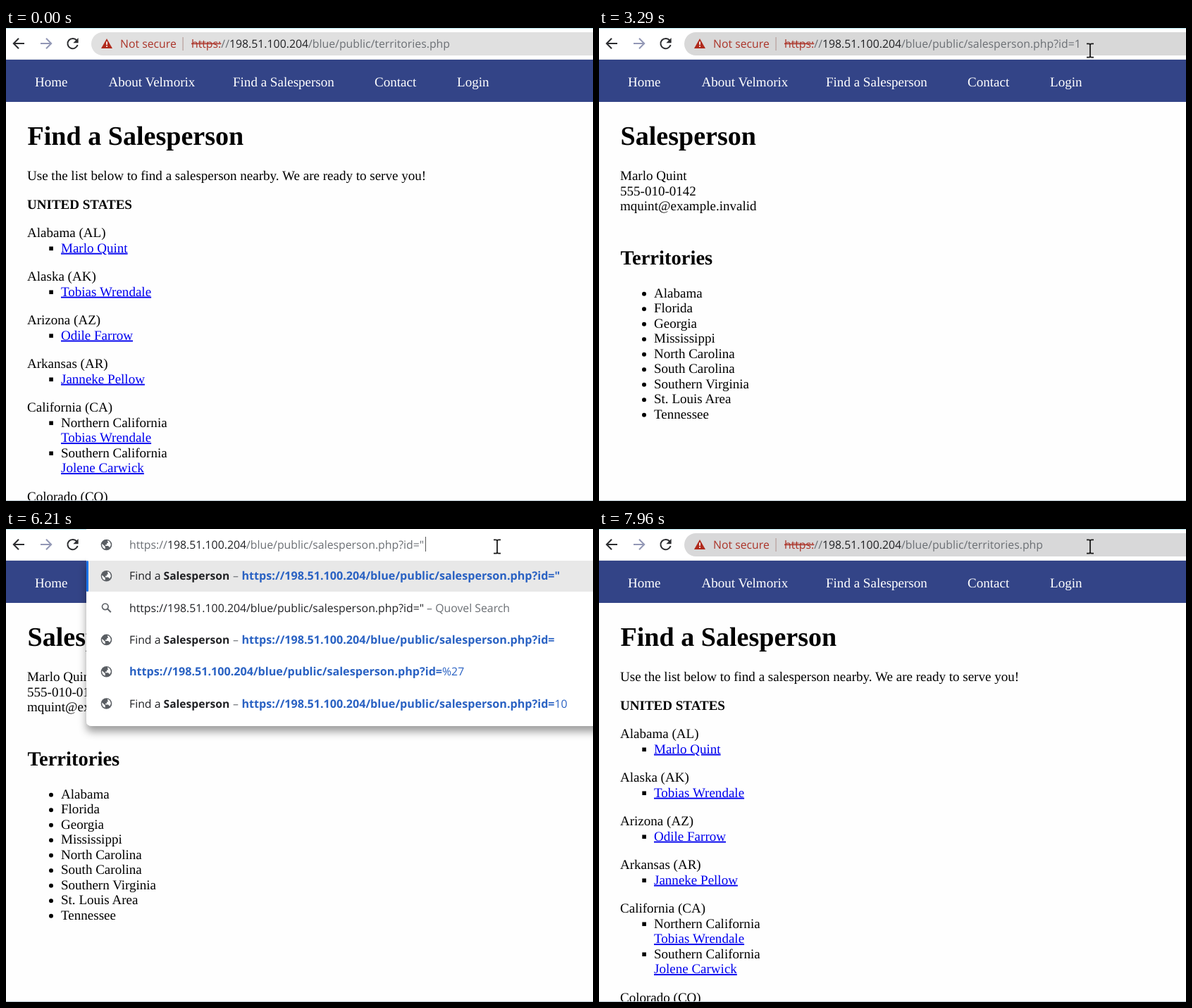
An HTML page for the animation above (8 s loop, 833 by 672 pixels).

```html
<!DOCTYPE html>
<html lang="en">
<head>
<meta charset="utf-8">
<title>Salesperson lookup</title>
<style>
html, body { margin: 0; width: 100%; height: 100%; overflow: hidden; background: #fff; }
svg { display: block; }
text { white-space: pre; text-rendering: geometricPrecision; font: 19.05px "Liberation Serif", serif; }
.h1 { font-size: 38.1px; font-weight: bold; }
.h2 { font-size: 28.6px; font-weight: bold; }
.bold { font-weight: bold; }
.link { fill: #0000ee; text-decoration: underline; }
.nav { fill: #fff; }
.ui { font: 15.82px "Open Sans", "Noto Sans", sans-serif; fill: #202124; }
.ui .strong { font-size: 16.15px; font-weight: 700; }
.ui .title { font-size: 15.6px; font-weight: 700; }
.blue { fill: #2a62c3; }
.grey { fill: #6b6f74; }
.red { fill: #ab3429; }
.struck { text-decoration: line-through; }
.line { fill: none; stroke: #2c2d30; stroke-width: 2; }
</style>
</head>
<body>
<svg id="stage" width="833" height="672" viewBox="0 0 833 672"></svg>
<script>
const LOOP = 8000;
const HOST = '198.51.100.204', DIR = '/blue/public/', PERSON = 'salesperson.php?id=';
const stage = document.getElementById('stage');

const text = (x, y, s, cls = '') => `<text x="${x}" y="${y}" class="${cls}">${s}</text>`;
const span = (s, cls) => `<tspan class="${cls}">${s}</tspan>`;
const rect = (x, y, w, h, fill, more = '') =>
  `<rect x="${x}" y="${y}" width="${w}" height="${h}" fill="${fill}" ${more}/>`;
const path = (d, more) => `<path d="${d}" ${more}/>`;
const at = (x, y, s) => `<g transform="translate(${x} ${y})">${s}</g>`;
const clamp = v => Math.max(0, Math.min(1, v));

// ---- Web pages

const NAV = [[41, 'Home'], [145.5, 'About Velmorix'], [322, 'Find a Salesperson'],
  [523, 'Contact'], [640, 'Login']];
const navBar = rect(0, 45, 833, 60, '#334487') +
  NAV.map(([x, s]) => text(x, 82.7, s, 'nav')).join('');

const square = y => rect(61.3, y - 8.2, 5.6, 5.6, '#000');
const AGENTS = [['Alabama (AL)', 'Marlo Quint'], ['Alaska (AK)', 'Tobias Wrendale'],
  ['Arizona (AZ)', 'Odile Farrow'], ['Arkansas (AR)', 'Janneke Pellow']];
const REGIONS = [['Northern California', 'Tobias Wrendale'], ['Southern California', 'Jolene Carwick']];

const listPage = text(30.5, 166, 'Find a Salesperson', 'h1') +
  text(30, 216, 'Use the list below to find a salesperson nearby. We are ready to serve you!') +
  text(30, 256.7, 'UNITED STATES', 'bold') +
  AGENTS.map(([state, name], i) => {
    const y = 297 + 62 * i;
    return text(30, y, state) + square(y + 21.7) + text(78, y + 21.7, name, 'link');
  }).join('') +
  text(30, 545, 'California (CA)') +
  REGIONS.map(([area, name], i) => {
    const y = 566.7 + 43 * i;
    return square(y) + text(78, y, area) + text(78, y + 21.5, name, 'link');
  }).join('') +
  text(30, 671.5, 'Colorado (CO)');

const TERRITORIES = ['Alabama', 'Florida', 'Georgia', 'Mississippi', 'North Carolina',
  'South Carolina', 'Southern Virginia', 'St. Louis Area', 'Tennessee'];
const personPage = text(30.5, 166, 'Salesperson', 'h1') +
  ['Marlo Quint', '555-010-0142', 'mquint@example.invalid']
    .map((s, i) => text(30, 216 + 21.5 * i, s)).join('') +
  text(30.5, 335.5, 'Territories', 'h2') +
  TERRITORIES.map((s, i) => {
    const y = 382.8 + 21.5 * i;
    return `<circle cx="64" cy="${y - 5}" r="3"/>` + text(78, y, s);
  }).join('');

// ---- Browser icons

const backArrow = path('M26 22H11M18 14.8L10.8 22L18 29.2', 'class="line"');
const nextArrow = path('M49 22H64M57 14.8L64.2 22L57 29.2', 'class="line" style="stroke:#9297b5"');
const reloadIcon = path('M100.3 17.6A7.2 7.2 0 1 0 101.6 24', 'class="line"') +
  path('M102.6 14V21.2H95.4Z', 'fill="#2c2d30"');
const stopIcon = path('M88 15.5L101.5 29M101.5 15.5L88 29', 'class="line" style="stroke-width:2.3"');
const warnIcon = path('M143 15L151 29H135Z', 'fill="#b02a1c"') +
  rect(142.2, 19.3, 1.7, 4.6, '#fff') + rect(142.2, 25.2, 1.7, 1.8, '#fff');
const infoIcon = '<circle cx="142.5" cy="22.5" r="7.3" fill="none" stroke="#5f6368" stroke-width="1.6"/>' +
  rect(141.7, 21.5, 1.7, 5, '#5f6368') + rect(141.7, 18.4, 1.7, 1.8, '#5f6368');
const globe = y => at(142.5, y, '<circle r="7.8" fill="#5a5e63"/>' +
  path('M-6.2 -1.4L-1.8 2.6V5.8C-5 5.2 -6.8 1.6 -6.2 -1.4ZM1.4 -6.2C4.4 -5.6 6.4 -2.6 6.3 0.6' +
    'L4.6 3.8L2.6 1.6H-1.4V-0.2H0.6V-2.4H2.4Z', 'fill="#fff"'));
const lens = y => at(142.5, y, path('M1.4 1.2L6.3 6.2', 'class="line" style="stroke:#5f6368"') +
  '<circle cx="-1.7" cy="-1.8" r="4.3" fill="none" stroke="#5f6368" stroke-width="1.7"/>');

// ---- Address bar

const pill = fill => rect(121, 6, 760, 33, fill, 'rx="16.5"');
const editedUrl = tail => span('https://', 'grey') + HOST + span(DIR + PERSON + tail, 'grey');

function insecureUrl(file, selected) {
  const scheme = selected ? span('https', 'struck') + '://' :
    span('https', 'red struck') + span(':', 'red struck') + span('//', 'grey');
  return warnIcon + text(162, 28, 'Not secure', 'ui red') + rect(250.5, 13, 1.2, 19, '#b79d9a') +
    (selected ? rect(263, 9, 422.5, 27, '#9cc3f4') : '') +
    text(263, 28, scheme + HOST + (selected ? DIR + file : span(DIR + file, 'grey')), 'ui');
}

const caret = x => rect(x, 11, 1, 21, '#555');

function addressBar(t) {
  if (t < 2140) return pill('#e0e0e0') + insecureUrl('territories.php');
  if (t < 3550) {
    const c = Math.round(224 - 8 * clamp((t - 2900) / 200));
    return pill(`rgb(${c},${c},${c})`) + insecureUrl(PERSON + '1');
  }
  if (t < 5270) {
    return rect(120.2, 5.2, 760, 33.6, '#fff', 'rx="16.8" stroke="#1a6fdc" stroke-width="2.4"') +
      insecureUrl(PERSON + '1', t >= 3750 && t < 4550) + (t >= 4550 ? caret(686) : '');
  }
  if (t < 7220) {
    const quoted = t >= 6210;
    const lit = t < 5810 || quoted && t < 6740;
    return rect(114, 0, 719, 45, '#fff') + globe(22.5) +
      text(175, 28, editedUrl(quoted ? '"' : ''), 'ui') + (lit ? caret(quoted ? 595 : 588) : '');
  }
  if (t < 7830) {
    return pill(t < 7400 ? '#dfdfdf' : '#d8d8d9') + infoIcon +
      text(162, 28, HOST + span(DIR + PERSON + '"', 'grey'), 'ui');
  }
  return pill('#d8d8d9') + insecureUrl('territories.php');
}

// ---- Suggestions

const boldUrl = (bold, rest) =>
  span('https://' + HOST + DIR + PERSON + bold, 'strong blue') + span(rest, 'blue');

function pageRow(y, bold, rest = '') {
  return globe(y) + text(175, y + 5.5, 'Find a ' + span('Salesperson', 'title'), 'ui') +
    text(322, y + 5.5, '–', 'ui grey') + text(334.5, y + 5.5, boldUrl(bold, rest), 'ui');
}
const bareRow = (y, rest) => globe(y) + text(175, y + 5.5, boldUrl('', rest), 'ui');
const searchRow = (y, tail) => lens(y) +
  text(175, y + 5.5, 'https://' + HOST + DIR + PERSON + tail + span(' – Quovel Search', 'grey'), 'ui');

function suggestions(t) {
  if (t < 5270 || t >= 7500) return '';
  const opacity = t < 5340 ? 0.6 : t < 7220 ? 1 : 0.85 * (7500 - t) / 280;
  const closing = t >= 7220, quoted = t >= 6210;
  const tail = quoted ? '"' : '';
  const y = i => 66.8 + 45.3 * i;
  const bottom = closing ? 144 : 280;
  let rows = pageRow(y(0), tail) + searchRow(y(1), tail);
  if (!closing) {
    rows += (quoted ? pageRow(y(2), '') + bareRow(y(3), '%27')
      : bareRow(y(2), '%27') + pageRow(y(3), '', '"')) + pageRow(y(4), '', '10');
  }
  return `<g opacity="${opacity.toFixed(3)}">` +
    path(`M114 44H860V${bottom}H122Q114 ${bottom} 114 ${bottom - 8}Z`, 'fill="#fff" filter="url(#shade)"') +
    rect(114, 44, 719, 45, '#e8e8e8') + rect(114, 45, 3, 44, '#1a73e8', 'rx="1.5"') + rows + '</g>';
}

// ---- Pointer

const ROUTE = [[70, 565, 652], [190, 118, 399], [400, 118, 399], [730, 133, 306], [1540, 133, 306],
  [1940, 622, 82], [2140, 620, 84], [2530, 592, 111], [2640, 592, 111], [2930, 676, 22],
  [3010, 682, 20], [3290, 697, 32], [4150, 697, 32], [4350, 697, 25], [LOOP, 697, 25]];
const CLICKS = [[1130, 1330, 133.5, 306.5], [3550, 3750, 694.5, 30.5], [4550, 4740, 694.5, 23.5]];

const OUTLINE = 'fill="#fff" stroke="#23252e" stroke-width="1.1" stroke-linejoin="round"';
const arrow = path('M0.5 0.5V18L4.6 14.2L7.5 20.8L10.4 19.5L7.5 13.1H13.2Z', OUTLINE);
const hand = path('M-1.6 15V2Q-1.6 0.3 0 0.3T1.7 2V8.5Q3.5 7.2 5 9Q7 8.2 8.3 10Q10.8 9 11.6 12' +
  'V18Q11 22 9 25H0Q-1.5 21.5 -6 16Q-7 14 -5 13.2Q-3.5 13 -1.6 15Z', OUTLINE);
const iBeam = path('M-5 -9.6H-2Q0 -9.6 0 -8Q0 -9.6 2 -9.6H5M0 -8V8M-5 9.6H-2Q0 9.6 0 8Q0 9.6 2 9.6H5',
  'fill="none" stroke="#1b1b1b" stroke-width="1.8"');

function pointer(t) {
  if (t < 70) return '';
  const i = ROUTE.findIndex(k => k[0] > t);
  const [t0, x0, y0] = ROUTE[i - 1], [t1, x1, y1] = ROUTE[i];
  const p = (t - t0) / (t1 - t0);
  const shape = t >= 2860 ? iBeam : t >= 660 && t < 1600 ? hand : arrow;
  const ring = CLICKS.filter(([from, to]) => t >= from && t < to)
    .map(([, , x, y]) => `<circle cx="${x}" cy="${y}" r="14" fill="#ff0" fill-opacity=".47"/>`).join('');
  return ring + at((x0 + (x1 - x0) * p).toFixed(2), (y0 + (y1 - y0) * p).toFixed(2), shape);
}

// ---- Scene

const DEFS = '<defs><filter id="shade" x="-5%" y="-10%" width="110%" height="140%">' +
  '<feDropShadow dx="0" dy="8" stdDeviation="6" flood-color="#000" flood-opacity=".38"/></filter></defs>';
const chrome = rect(0, 0, 833, 45, '#fff') + rect(0, 0, 833, 1, '#b5e4ee') +
  rect(0, 43.5, 833, 1, '#dcdfe6') + backArrow + nextArrow;

function scene(t) {
  const busy = t >= 1330 && t < 2140 || t >= 7220 && t < 7900;
  const onPerson = t >= 2140 && t < 7830;
  return DEFS + rect(0, 0, 833, 672, '#fefefe') + (onPerson ? personPage : listPage) +
    rect(0, 671, 833, 1, '#b9c6cf') + navBar + chrome + (busy ? stopIcon : reloadIcon) +
    suggestions(t) + addressBar(t) + pointer(t);
}

let shown = '';
function draw(now) {
  const next = scene(now % LOOP);
  if (next !== shown) stage.innerHTML = shown = next;
  requestAnimationFrame(draw);
}
draw(0);
</script>
</body>
</html>
```
